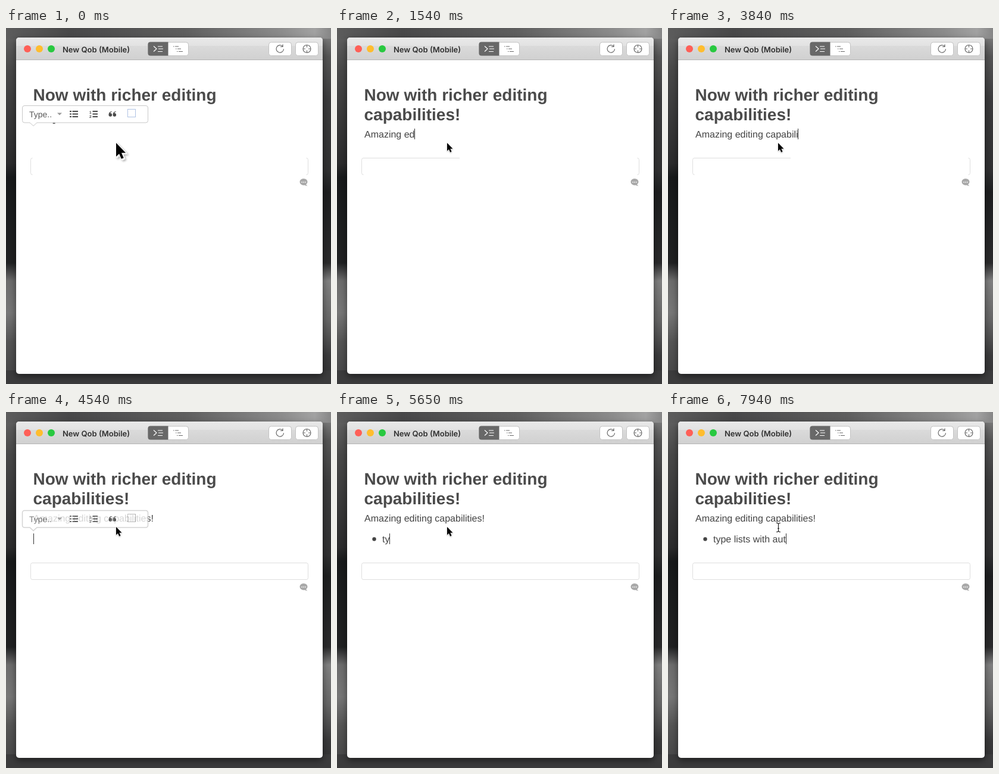
An HTML page that plays this animation: 546x598 px, repeating every 8 s.

```html
<!DOCTYPE html>
<html lang="en">
<head>
<meta charset="utf-8">
<title>Editor</title>
<style>
html, body { margin: 0; width: 100%; height: 100%; overflow: hidden; background: #333; }
svg { display: block; width: 546px; height: 598px; }
text { font-family: "Liberation Sans", Arial, sans-serif; white-space: pre; text-rendering: geometricPrecision; }
.head { font-size: 28px; font-weight: bold; fill: #4b4b4b; }
.body { font-size: 16px; fill: #444; }
.title { font: 600 13px Inter, sans-serif; fill: #303030; }
.tool { font-size: 14px; fill: #5a5a5a; }
.panel { fill: #fff; stroke: #c8c8c8; }
.line { fill: none; stroke: #4a4a4a; stroke-width: 2.2; }
.thin { fill: none; stroke: #6a6a6a; stroke-width: 1.2; }
.edge { fill: none; stroke: #dedede; }
</style>
</head>
<body>
<svg viewBox="0 0 546 598">
  <defs>
    <linearGradient id="left" x2="0" y2="1">
      <stop stop-color="#646464"/><stop offset=".12" stop-color="#484848"/>
      <stop offset=".38" stop-color="#2b2b2c"/><stop offset=".42" stop-color="#17191a"/>
      <stop offset=".66" stop-color="#202122"/><stop offset=".71" stop-color="#6c6c6c"/>
      <stop offset=".8" stop-color="#777"/><stop offset=".88" stop-color="#555"/>
      <stop offset="1" stop-color="#434344"/>
    </linearGradient>
    <linearGradient id="right" x2="0" y2="1">
      <stop stop-color="#8a8a8a"/><stop offset=".08" stop-color="#555"/>
      <stop offset=".2" stop-color="#3c3c3d"/><stop offset=".4" stop-color="#303031"/>
      <stop offset=".46" stop-color="#1d1e1f"/><stop offset=".66" stop-color="#2a2a2b"/>
      <stop offset=".71" stop-color="#808080"/><stop offset=".82" stop-color="#666"/>
      <stop offset=".92" stop-color="#3a3a3b"/><stop offset="1" stop-color="#303031"/>
    </linearGradient>
    <linearGradient id="top">
      <stop stop-color="#5c5c5c"/><stop offset=".2" stop-color="#484849"/>
      <stop offset=".55" stop-color="#5e5e5e"/><stop offset=".85" stop-color="#8c8c8c"/>
      <stop offset=".95" stop-color="#a2a2a2"/><stop offset="1" stop-color="#868686"/>
    </linearGradient>
    <linearGradient id="bar" x2="0" y2="1">
      <stop stop-color="#e9e9e9"/><stop offset=".38" stop-color="#e2e2e2"/>
      <stop offset=".38" stop-color="#dadada"/><stop offset="1" stop-color="#d0d0d0"/>
    </linearGradient>
    <filter id="shadow" x="-10%" y="-10%" width="120%" height="120%">
      <feDropShadow dx="0" dy="4" stdDeviation="6" flood-opacity=".5"/>
    </filter>
    <g id="quote" fill="#4a4a4a">
      <path id="mark" d="M0 6a2.8 2.8 0 1 0 2.6-2.9C2.7 2 3.6 1.3 5.2 1V0C2 .3 0 2.6 0 6z"/>
      <use href="#mark" x="7"/>
    </g>
    <g id="type">
      <text class="tool" x="39" y="150">Type..</text>
      <path d="M86 142.500h8l-4 4z" fill="#999"/>
    </g>
  </defs>

  <rect width="273" height="598" fill="url(#left)"/>
  <rect x="273" width="273" height="598" fill="url(#right)"/>
  <rect width="546" height="18" fill="url(#top)"/>
  <rect y="575" width="546" height="23" fill="#3b3b3c"/>
  <rect x="17" y="16" width="515" height="565" rx="5" fill="#fff" filter="url(#shadow)"/>
  <path d="M17 54V21a5 5 0 0 1 5-5H527a5 5 0 0 1 5 5V54z" fill="url(#bar)"/>
  <path d="M17 53.500H532" stroke="#b5b5b5"/>
  <circle cx="36" cy="35" r="6" fill="#ff5f57"/>
  <circle cx="56" cy="35" r="6" fill="#ffbd2e"/>
  <circle cx="76" cy="35" r="6" fill="#28c940"/>
  <text class="title" x="95" y="41">New Qob (Mobile)</text>

  <!-- Title bar buttons -->
  <g stroke="#c2c2c2" fill="#fff">
    <rect x="238.500" y="24" width="68" height="22.500" rx="4"/>
    <rect x="441.500" y="24" width="38" height="22.500" rx="4"/>
    <rect x="486.500" y="24" width="38" height="22.500" rx="4"/>
  </g>
  <path d="M272.500 23.500H242.500a4 4 0 0 0-4 4v15a4 4 0 0 0 4 4h30z" fill="#686868"/>
  <path d="M248 30.500l5 4.500-5 4.500M255 31h8M256 35h8M255 39.500h8" fill="none" stroke="#fff" stroke-width="1.200"/>
  <path class="thin" d="M281 31h1.500m1.500 0h6M285 35h1.500m1.500 0h6M287 39.500h1.500m1.500 0h7"/>
  <path class="thin" d="M464.500 30.500a6.200 6.200 0 1 0 2 4.800M465 27.500v4h-4"/>
  <path class="thin" d="M499 35a6.500 6.500 0 1 0 13 0a6.500 6.500 0 1 0-13 0M505.500 28.500v4M505.500 37.500v4M499 35h4M508 35h4"/>

  <text class="head" x="45.500" y="122">Now with richer editing</text>
  <text class="head" x="45.500" y="155">capabilities!</text>
  <text class="body" id="first" x="46" y="184"></text>
  <circle id="bullet" cx="62.500" cy="213.500" r="3.200" fill="#444"/>
  <text class="body" id="second" y="219"></text>
  <rect id="caret" width="1" height="18" fill="#333"/>

  <g id="field">
    <path class="edge" id="sides" d="M44.500 218.500a3 3 0 0 0-3 3v22a3 3 0 0 0 3 3M504.500 218.500a3 3 0 0 1 3 3v22a3 3 0 0 1-3 3"/>
    <path class="edge" id="topPart" d="M44 218.500H206"/>
    <path class="edge" id="whole" d="M44 218.500H505M44 246.500H505"/>
    <path d="M493.500 258.500a6.500 5.500 0 1 1 10.500 4.300l2.300 2.700-5-1.500a6.500 5.500 0 0 1-7.800-5.500z" fill="#a9a9a9"/>
    <path d="M496.300 259h1.600m1.300 0h1.600m1.300 0h1.600" stroke="#fff" stroke-width="1.600"/>
  </g>

  <g id="mainTools">
    <path class="panel" d="M31 130.500H235a3.500 3.500 0 0 1 3.500 3.500v21.500a3.500 3.500 0 0 1-3.500 3.500H52l-6 5.500-6-5.500H31a3.500 3.500 0 0 1-3.500-3.500V134a3.500 3.500 0 0 1 3.500-3.500z"/>
    <use href="#type"/>
    <path class="line" d="M107 140h3m1.500 0h9.500M107 144.500h3m1.500 0h9.500M107 149h3m1.500 0h9.500"/>
    <path class="line" d="M145.500 140h8.500M145.500 144.500h8.500M145.500 149h8.500"/>
    <g font-size="6.500" font-weight="bold" fill="#4a4a4a"><text x="140" y="143.500">1</text><text x="140" y="151">2</text></g>
    <use href="#quote" x="172.500" y="140"/>
    <rect id="dots" x="204.500" y="136.500" width="13" height="13" fill="none" stroke-dasharray="1"/>
  </g>

  <g id="listTools" transform="translate(0 35)">
    <path class="panel" stroke-width="1.500" d="M31 130.500H212a3.500 3.500 0 0 1 3.500 3.500v21.500a3.500 3.500 0 0 1-3.500 3.500H75l-6 5.500-6-5.500H31a3.500 3.500 0 0 1-3.500-3.500V134a3.500 3.500 0 0 1 3.500-3.500z"/>
    <use href="#type"/>
    <use href="#quote" x="106.500" y="140"/>
    <path class="line" stroke-width="1.800" d="M138 138.500h16M144.500 142h9.500M144.500 145.500h9.500M138 149h16"/>
    <path d="M142.500 140.500v6.500l-4.500-3.200z" fill="#4a4a4a"/>
    <rect x="173.500" y="136.500" width="14" height="14" fill="none" stroke="#555" stroke-dasharray="1"/>
  </g>

  <path id="arrow" d="M0 0V13.500L3 10.700 5.200 15.800 7.500 14.800 5.300 9.800H9.500z" stroke="#fff" stroke-width="1" paint-order="stroke"/>
  <g id="beam" fill="none">
    <path d="M182 186.500h2l1.500 1.500 1.500-1.500h2M185.500 188v12M182 201.500h2l1.500-1.500 1.500 1.500h2M184 195.500h3" stroke="#fff" stroke-width="2.600"/>
    <path d="M182 186.500h2l1.500 1.500 1.500-1.500h2M185.500 188v12M182 201.500h2l1.500-1.500 1.500 1.500h2M184 195.500h3" stroke="#222" stroke-width="1.200"/>
  </g>
</svg>
<script>
const LOOP = 8000, NEWLINE = 4420, LIST = 5010;
const $ = id => document.getElementById(id);
const show = (id, on) => $(id).style.display = on ? '' : 'none';
const ramp = (t, a, b) => Math.min(1, Math.max(0, (t - a) / (b - a)));

// Each burst adds its chunks at even steps between two times.
function typing(bursts) {
  const keys = [];
  let text = '';
  for (const [from, to, ...chunks] of bursts) {
    chunks.forEach((chunk, i) => {
      text = chunk === '<' ? text.slice(0, -1) : text + chunk;
      keys.push([from + (to - from) * i / Math.max(1, chunks.length - 1), text]);
    });
  }
  return t => keys.reduce((now, [at, value]) => t >= at ? value : now, '');
}

const firstLine = typing([
  [300, 300, 'A'], [530, 530, 'm'], [770, 770, 'a'],
  [950, 1360, 'z', 'i', 'n', 'g', ' e'],
  [1540, 1660, ...'dit'],
  [2080, 2540, ...'ing cab'],
  [2840, 3020, '<', ...'pa'],
  [3430, 3610, ...'bil'],
  [3790, 4010, ...'ities'],
  [4190, 4190, '!']
]);
const listLine = typing([
  [5430, 5590, ...'ty'],
  [5760, 6350, ...'pe list', 's '],
  [6520, 6750, 'wi', 'th', ' '],
  [7580, 7700, ...'au'],
  [7940, 7940, 't']
]);

function draw(t) {
  const below = t >= NEWLINE, list = t >= LIST;
  $('first').textContent = firstLine(t);
  $('second').textContent = list ? listLine(t) : t >= 4890 ? '*' : '';
  $('second').setAttribute('x', list ? 76 : 46);
  show('bullet', list);

  const line = $(below ? 'second' : 'first');
  const end = +line.getAttribute('x') + line.getComputedTextLength();
  $('caret').setAttribute('x', Math.floor(end + .3));
  $('caret').setAttribute('y', below ? 204 : 169);
  show('caret', t >= 300 && !(t >= 7230 && t < 7580));

  $('field').setAttribute('transform', `translate(0 ${below ? 35 : 0})`);
  show('topPart', t >= 300 && !below);
  show('whole', below);

  const main = $('mainTools');
  main.setAttribute('transform', `translate(0 ${below ? 35 : 0})`);
  main.setAttribute('stroke-width', below ? 1.5 : 1);
  main.style.opacity = below ? ramp(t, 4400, 4580) - ramp(t, 4860, 5010) : 1 - ramp(t, 270, 460);
  $('dots').setAttribute('stroke', below ? '#555' : '#5f86c8');
  $('dots').setAttribute('stroke-width', 1);
  $('listTools').style.opacity = ramp(t, LIST, 5180) - ramp(t, 5430, 5640);

  const size = 1.7 - .7 * ramp(t, 280, 460);
  $('arrow').setAttribute('transform', `translate(185 193) scale(${size})`);
  $('arrow').style.filter = size > 1
    ? 'drop-shadow(1px 1px 0 #fff) drop-shadow(1px 1px 1px #aaa)'
    : 'drop-shadow(0 1px 1px #bbb)';
  show('arrow', t < 5900);
  show('beam', t >= 5900);
}

const start = performance.now();
function tick() {
  draw((performance.now() - start) % LOOP);
  requestAnimationFrame(tick);
}
tick();
</script>
</body>
</html>
```
